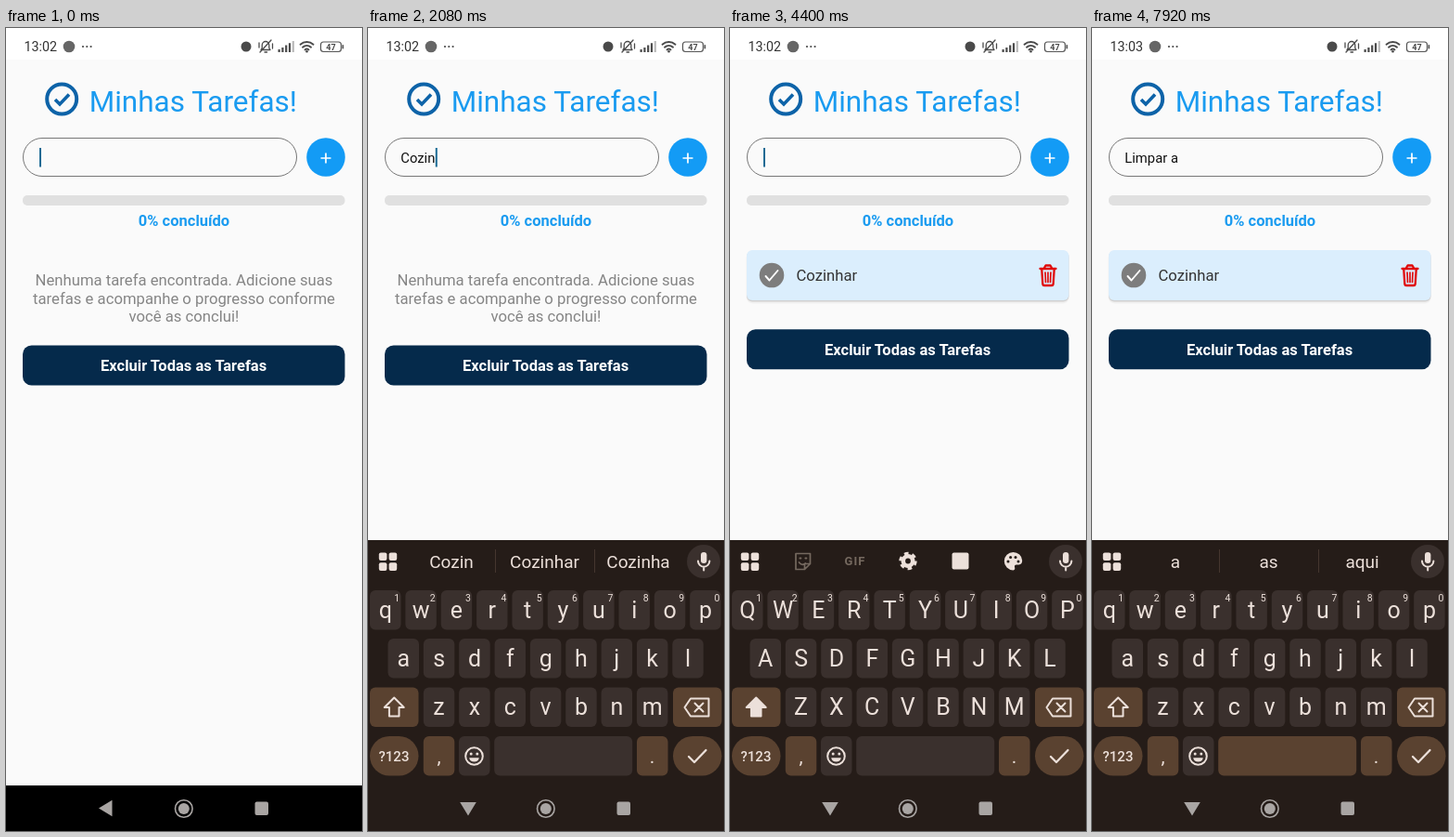
An HTML page that plays this animation: 384x864 px, repeating every 8 s.

```html
<!DOCTYPE html>
<html lang="pt-BR">
<head>
<meta charset="utf-8">
<title>Minhas Tarefas</title>
<style>
  html, body { margin: 0; width: 100%; height: 100%; overflow: hidden; background: #fafafa; }
  svg { display: block; width: 100vw; height: 100vh; font-family: Roboto, sans-serif; }
  text { white-space: pre; }
  .mid { text-anchor: middle; }
  .bold { font-weight: 700; font-size: 16.5px; }
  .line { fill: none; stroke-linecap: round; stroke-linejoin: round; }
  #keyboard text { fill: #ece0da; }
  #keyboard .dim { fill: #75695f; }
  .key { fill: #3a302d; }
  .accent, .key.pressed { fill: #5a4230; }
  .letter { font-size: 25px; }
  .hint { font-size: 10.5px; }
  .word { font-size: 19px; }
</style>
</head>
<body>
<svg viewBox="0 0 384 864">
  <rect width="384" height="864" fill="#fafafa"/>
  <rect width="384" height="34" fill="#fff"/>

  <g id="status" fill="#4a4a4a" stroke="none">
    <text id="clock" x="19.5" y="25" font-size="14.3" fill="#333"></text>
    <circle cx="68" cy="20" r="6.3" fill="#666"/>
    <circle cx="83" cy="20" r="1.1"/><circle cx="87.3" cy="20" r="1.1"/><circle cx="91.6" cy="20" r="1.1"/>
    <circle cx="259" cy="20" r="5.5"/>
    <g class="line" stroke="#4a4a4a" stroke-width="1.3">
      <path d="M275 23.5h10l-1.2-2v-3a3.8 4 0 0 0-7.6 0v3zM279 26h2.5M274 26l12-13M273 16v5M287.500 17v5"/>
    </g>
    <path d="M293.500 23h2.200v3h-2.200zM297.300 21h2.200v5h-2.200zM301.100 18.500h2.200v7.500h-2.200zM304.900 16.300h2.200v9.700h-2.200z"/>
    <path d="M308.700 14h2.200v12h-2.200z" fill="#bbb"/>
    <g class="line" stroke="#4a4a4a" stroke-width="1.9">
      <path d="M317.500 17.700a10.500 10.500 0 0 1 14 0M320 20.700a6.800 6.800 0 0 1 9 0M322.500 23.400a3 3 0 0 1 4 0"/>
    </g>
    <circle cx="324.500" cy="25.300" r="1.300"/>
    <rect x="339.500" y="15" width="22" height="10.500" rx="3" fill="none" stroke="#555" stroke-width="1.200"/>
    <rect x="362.600" y="18" width="1.600" height="4.500" rx=".8"/>
    <text class="mid" x="350.500" y="23.500" font-size="9" font-weight="700">47</text>
  </g>

  <g class="line" stroke="#0d63a8" stroke-width="4">
    <circle cx="60.200" cy="76.500" r="16"/>
    <path d="M53 77l5 5 10-10.500" stroke-linecap="butt" stroke-linejoin="miter" stroke-width="3.600"/>
  </g>
  <text x="89.700" y="89.500" font-size="31.500" fill="#1a9bf0">Minhas Tarefas!</text>

  <rect x="18.500" y="118.500" width="295" height="41" rx="20.500" fill="#fafafa" stroke="#777"/>
  <text id="input" x="35.300" y="145" font-size="14.800" fill="#111"></text>
  <rect id="cursor" y="129" width="2" height="20.500" fill="#1a6a94"/>
  <g id="add">
    <circle cx="345" cy="139" r="20.800" fill="#139bf5"/>
    <path d="M339.500 140h11M345 134.500v11" stroke="#fff" stroke-width="1.700"/>
  </g>

  <rect x="18" y="180" width="347.500" height="11" rx="5" fill="#e0e0e0"/>
  <text class="mid bold" x="192" y="213.300" fill="#1a9bf0">0% concluído</text>

  <g id="empty" class="mid" font-size="16.700" fill="#858585">
    <text x="192" y="277.200">Nenhuma tarefa encontrada. Adicione suas</text>
    <text x="192" y="296.800">tarefas e acompanhe o progresso conforme</text>
    <text x="192" y="316.300">você as conclui!</text>
  </g>

  <g id="card">
    <rect x="17.500" y="240" width="348.500" height="56.500" rx="7" fill="#000" opacity=".04"/>
    <rect x="18" y="240" width="347.500" height="54.500" rx="6" fill="#000" opacity=".13"/>
    <rect x="18" y="239" width="347.500" height="54" rx="6" fill="#dbeefd"/>
    <circle cx="45" cy="266" r="13.300" fill="#7d7d7d"/>
    <path class="line" d="M38.500 267l4 4.500 9-10.500" stroke="#fff" stroke-width="1.900"/>
    <text x="71.500" y="272" font-size="16.700" fill="#333">Cozinhar</text>
    <g class="line" stroke="#e00b0b" stroke-width="2.300">
      <path d="M334.500 259h17M339 258l1.500-2.500h5l1.500 2.500M336.300 260l1 15.500q.2 1.500 1.700 1.500h8q1.500 0 1.700-1.500l1-15.500"/>
      <path d="M340 263l.5 10.500M343 263v10.500M346 263l-.5 10.500" stroke-width="1.700"/>
    </g>
  </g>

  <g id="clear">
    <rect x="18" y="341.500" width="347.500" height="43" rx="9.500" fill="#052a4b"/>
    <text class="mid bold" x="191.600" y="369" fill="#fff">Excluir Todas as Tarefas</text>
  </g>

  <rect y="815" width="384" height="49"/>
  <g id="keyboard">
    <rect y="551" width="384" height="313" fill="#251c18"/>
    <g fill="#ece0da">
      <rect x="11.800" y="564.500" width="8.600" height="8.600" rx="2"/><rect x="22.600" y="564.500" width="8.600" height="8.600" rx="2"/>
      <rect x="11.800" y="575.300" width="8.600" height="8.600" rx="2"/><rect x="22.600" y="575.300" width="8.600" height="8.600" rx="2"/>
    </g>
    <circle cx="362" cy="574" r="18" fill="#3a302d"/>
    <rect x="359" y="564" width="6.400" height="12" rx="3.200" fill="#ece0da"/>
    <path class="line" d="M356 573.500a6.200 6.200 0 0 0 12.400 0M362.200 580v3.500" stroke="#ece0da" stroke-width="2"/>

    <g id="toolbar">
      <g class="line" stroke="#75695f" stroke-width="1.700">
        <path d="M71 565.500h15.500v11l-6 6H71zM86.500 576.500h-6v6M74.500 575q3 4 7 1"/>
        <path d="M75.500 570.500h.8M81.500 570.500h.8" stroke-width="2.200"/>
      </g>
      <text class="mid dim" x="135" y="578.300" font-size="13" font-weight="700" letter-spacing="1">GIF</text>
      <g fill="none" stroke="#ece0da">
        <circle cx="192" cy="573.500" r="5.200" stroke-width="4.600"/>
        <circle cx="192" cy="573.500" r="8.200" stroke-width="3" stroke-dasharray="4.600 3.987"/>
      </g>
      <rect x="239.500" y="564.500" width="18" height="18" rx="2" fill="#ece0da"/>
      <path d="M305.500 564a9.700 9.700 0 1 0 0 19.400q2.600-.6 1.500-3.400-.5-2.500 2-2.600h2.500q3.700-.5 3.700-4.500a9.700 9.300 0 0 0-9.700-8.900z" fill="#ece0da"/>
      <g fill="#251c18">
        <circle cx="300" cy="574" r="1.500"/><circle cx="302.600" cy="569.500" r="1.500"/>
        <circle cx="308" cy="569.500" r="1.500"/><circle cx="311" cy="574" r="1.500"/>
      </g>
    </g>
    <g id="suggestions">
      <path d="M137.500 561v25M244.500 561v25" stroke="#45362f"/>
    </g>

    <g id="keys"></g>
    <path id="shift" class="line" d="M28.200 720.500l10.500 10.500h-5.200v9.500h-10.600v-9.500h-5.200z" stroke="#ece0da" stroke-width="2"/>
    <g class="line" stroke="#ece0da" stroke-width="2">
      <path d="M341.500 731l6.500-9.500h19.500v19H348zM352.500 726.500l9 9M361.500 726.500l-9 9"/>
      <path d="M346 784l6 6 12.500-13" stroke-width="2.300"/>
      <circle cx="114.500" cy="783.500" r="9.300"/>
    </g>
    <circle cx="111.200" cy="781" r="1.500" fill="#ece0da"/><circle cx="117.800" cy="781" r="1.500" fill="#ece0da"/>
    <path d="M109.200 785.200h10.600a5.400 5.400 0 0 1-10.600 0z" fill="#ece0da"/>
    <text class="mid" x="28" y="788.500" font-size="15" font-weight="500">?123</text>
    <text class="mid" x="76.500" y="791" font-size="21">,</text>
    <text class="mid" x="306.500" y="791" font-size="21">.</text>
  </g>

  <g fill="#a9a5a3">
    <path id="back" d="M-8 0L6.500-8.800V8.800z"/>
    <circle cx="191.800" cy="840" r="9.300" fill="none" stroke="#a9a5a3" stroke-width="1.600"/>
    <circle cx="191.800" cy="840" r="6"/>
    <rect x="268.500" y="832.500" width="14.500" height="14.500" rx="2"/>
  </g>
</svg>

<script>
const LOOP = 8000, STEP = 80;
const $ = id => document.getElementById(id);

function add(parent, tag, attrs, content = '') {
  const node = document.createElementNS('http://www.w3.org/2000/svg', tag);
  for (const name in attrs) node.setAttribute(name, attrs[name]);
  node.textContent = content;
  return parent.appendChild(node);
}

// Keyboard
const PITCH = 38.35, KEY = 33.5;
const keys = {}, letters = {};

function addKey(name, x, y, width = KEY, kind = 'key', rx = 6) {
  keys[name] = add($('keys'), 'rect', { class: kind, x, y, width, height: 42.5, rx });
}
[['qwertyuiop', 2, 605], ['asdfghjkl', 21.5, 657], ['zxcvbnm', 59.8, 709.5]].forEach(([row, left, y]) => {
  [...row].forEach((char, i) => {
    const x = left + i * PITCH;
    addKey(char, x, y);
    letters[char] = add($('keys'), 'text', { class: 'mid letter', x: x + KEY / 2, y: y + 29.8 });
    if (y === 605) add($('keys'), 'text', { class: 'mid hint', x: x + 29.3, y: 617 }, (i + 1) % 10);
  });
});
addKey('shift', 2, 709.5, 52.5, 'accent');
addKey('delete', 329, 709.5, 52.5, 'accent');
addKey('symbols', 2, 762, 52.5, 'accent', 21.2);
addKey('comma', 59.8, 762, KEY, 'accent');
addKey('emoji', 98, 762);
addKey('space', 136.2, 762, 149);
addKey('period', 290, 762, KEY, 'accent');
addKey('enter', 329, 762, 52.5, 'accent', 21.2);

const words = [90, 190.5, 291.5].map(x => add($('suggestions'), 'text', { class: 'mid word', x, y: 580.5 }));

// Each entry changes part of the state; a pressed key lasts until the next entry.
const timeline = [
  [0, { text: '', cursor: true, suggest: '', task: false, clock: '13:02' }],
  [160, { cursor: false }],
  [400, { cursor: true }],
  [880, { cursor: false }],
  [1120, { cursor: true, press: 'c' }],
  [1200, { text: 'C', suggest: 'C Com Como' }],
  [1360, { press: 'o' }],
  [1440, { text: 'Co', suggest: 'Co Com Como' }],
  [1600, { press: 'z' }],
  [1680, { text: 'Coz', suggest: 'Coz Cozinha Cozinhar' }],
  [1920, { text: 'Cozi', suggest: 'Cozi Cozinha Cozinhar' }],
  [2000, { press: 'n' }],
  [2080, { text: 'Cozin', suggest: 'Cozin Cozinhar Cozinha' }],
  [2160, { press: 'h' }],
  [2240, { text: 'Cozinh', suggest: 'Cozinh Cozinha Cozinhar' }],
  [2320, { press: 'a' }],
  [2400, { text: 'Cozinha', suggest: 'Cozinha Cozinhar Cozinhando' }],
  [2640, { text: 'Cozinhar ' }],
  [2720, { suggest: 'e pra a' }],
  [3280, { press: 'add' }],
  [3360, { text: '', suggest: '', task: true }],
  [3920, { cursor: false }],
  [4400, { cursor: true }],
  [4560, { press: 'l' }],
  [4640, { text: 'L', suggest: 'L La Lavar' }],
  [4800, { text: 'Li', suggest: 'Li Limpar Ligar' }],
  [5200, { text: 'Lio', suggest: 'Lio Limpar Ligar' }],
  [5280, { press: 'a' }],
  [5360, { text: 'Lioa', suggest: 'Lioa Limpa Limpar' }],
  [5520, { text: 'Lioar' }],
  [5600, { suggest: 'Lioar Limpar Ligar' }],
  [6080, { cursor: false }],
  [6320, { text: 'Limpar', cursor: true, suggest: 'Limpar Limpa Ligar' }],
  [6720, { press: 'space' }],
  [6800, { text: 'Limpar ', suggest: 'a o as' }],
  [7280, { press: 'a' }],
  [7360, { text: 'Limpar a', suggest: 'a as aqui' }],
  [7920, { cursor: false, press: 'space', clock: '13:03' }],
];

function stateAt(time) {
  const state = {};
  for (const [start, change] of timeline) {
    if (start <= time) Object.assign(state, { press: '' }, change);
  }
  return state;
}

const clamp = v => Math.min(1, Math.max(0, v));
const show = (node, visible) => node.setAttribute('display', visible ? 'inline' : 'none');

function draw(time) {
  const state = stateAt(time);
  const caps = state.text === '';

  $('clock').textContent = state.clock;
  $('input').textContent = state.text;
  $('cursor').setAttribute('x', 36 + (caps ? 0 : $('input').getComputedTextLength() - 0.3));
  show($('cursor'), state.cursor);
  $('add').setAttribute('opacity', state.press === 'add' ? 0.4 : 1);
  show($('empty'), !state.task);
  show($('card'), state.task);
  $('clear').setAttribute('transform', `translate(0 ${state.task ? -17.3 : 0})`);

  show($('toolbar'), !state.suggest);
  show($('suggestions'), state.suggest);
  const suggested = state.suggest.split(' ');
  words.forEach((word, i) => { word.textContent = suggested[i] || ''; });
  for (const char in letters) letters[char].textContent = caps ? char.toUpperCase() : char;
  for (const name in keys) keys[name].classList.toggle('pressed', state.press === name);
  $('shift').style.fill = caps ? '#ece0da' : 'none';

  const rise = 1 - (1 - clamp((time - 80) / 240)) ** 2;
  $('keyboard').setAttribute('transform', `translate(0 ${313 * (1 - rise)})`);
  const turn = clamp((time - 80) / 320);
  $('back').setAttribute('transform', `translate(108 839.5) rotate(${-90 * turn * turn * (3 - 2 * turn)})`);
}

function tick() {
  draw(Math.floor(performance.now() % LOOP / STEP) * STEP);
  requestAnimationFrame(tick);
}
tick();
</script>
</body>
</html>
```
